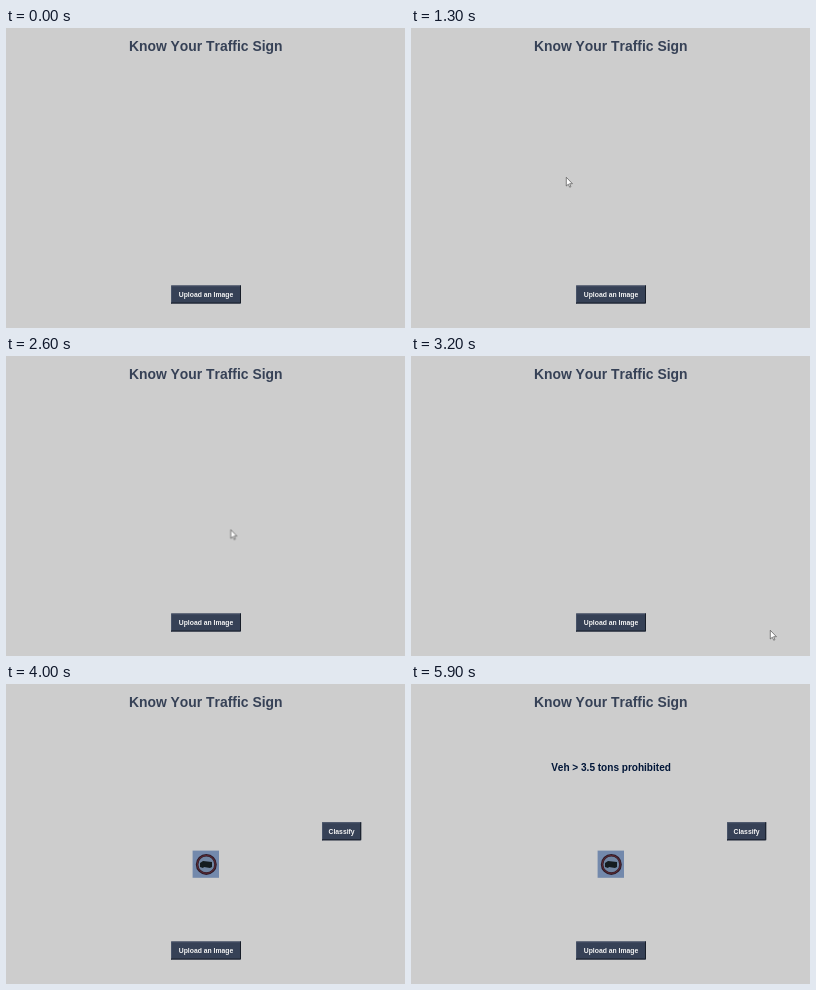
These frames come from a looping animation (399x300 px, 6 s). An HTML page:

```html
<!DOCTYPE html>
<html lang="en">
<head>
<meta charset="utf-8">
<title>Know Your Traffic Sign</title>
<style>
  html, body { margin: 0; width: 100%; height: 100%; overflow: hidden; background: #cdcdcd; }
  svg { display: block; width: 100%; height: 100%; }
  text {
    font-family: "Liberation Sans", Arial, sans-serif;
    font-weight: bold;
    font-kerning: none;
    text-anchor: middle;
  }
</style>
</head>
<body>
<svg viewBox="0 0 399 300">
  <text x="199.7" y="23.3" font-size="13.9" fill="#364156">Know Your Traffic Sign</text>
  <text id="result" x="200" y="86.8" font-size="10.05" fill="#011638">Veh &gt; 3.5 tons prohibited</text>

  <g id="sign">
    <rect x="186.6" y="166.6" width="26.4" height="27.2" fill="#7389ac"/>
    <circle cx="200.3" cy="180.4" r="9.2" fill="#7085a2" stroke="#2e1c27" stroke-width="2.6"/>
    <circle cx="200.3" cy="180.4" r="9" fill="none" stroke="#5e2934"/>
    <path d="M194 179l3-2 9 1v5l-2 1-6-1-1 1-3-1z" fill="#141c20"/>
  </g>

  <g id="buttons"></g>

  <path id="cursor" d="M.3 .3V9L2.3 7.2 3.7 10.2 4.9 9.7 3.6 6.7H6.4Z"
        fill="#fff" stroke="#444" stroke-width=".65" stroke-linejoin="round"/>
</svg>
<script>
const LOOP = 6000, TICK = 100;
const byId = id => document.getElementById(id);

// Plays [time, value] steps as hard changes; each value holds until the next.
function play(el, prop, steps) {
  const frames = steps.map(([t, v]) => ({ offset: t / LOOP, [prop]: v, easing: 'step-end' }));
  frames.push({ offset: 1, [prop]: steps[steps.length - 1][1] });
  el.animate(frames, { duration: LOOP, iterations: Infinity });
}

const appear = (el, from, to = LOOP) =>
  play(el, 'opacity', [[0, 0], [from, 1], ...(to < LOOP ? [[to, 0]] : [])]);

const RAISED = { fill: '#364156', ink: '#f4f4f4', light: '#485368', dark: '#171d28', shift: 0 };
const SUNKEN = { fill: '#f0f0f0', ink: '#1c1c28', light: '#8c8c8c', dark: '#f6f6f6', shift: .5 };

function face(x, y, w, h, label, { fill, ink, light, dark, shift }) {
  return `<g><rect x="${x}" y="${y}" width="${w}" height="${h}" fill="${fill}"/>
    <path d="M${x + .5} ${y + h}V${y + .5}H${x + w}" fill="none" stroke="${light}"/>
    <path d="M${x} ${y + h - .5}H${x + w - .5}V${y}" fill="none" stroke="${dark}"/>
    <text x="${x + w / 2 + shift}" y="${y + h / 2 + 2.6 + shift}" font-size="6.8" fill="${ink}">${label}</text></g>`;
}

function button(x, y, w, h, label, pressAt, releaseAt) {
  const group = document.createElementNS('http://www.w3.org/2000/svg', 'g');
  group.innerHTML = face(x, y, w, h, label, RAISED) + face(x, y, w, h, label, SUNKEN);
  byId('buttons').append(group);
  appear(group.lastElementChild, pressAt, releaseAt);
  return group;
}

// Eases the cursor through its moves, one hard step per tick.
function glide(el, [x, y], moves) {
  const steps = [[0, x, y]];
  for (const { start, end, to } of moves) {
    const [, x0, y0] = steps[steps.length - 1];
    for (let t = start; t <= end; t += TICK) {
      const k = (t - start + TICK) / (end - start + TICK);
      const e = k * k * (3 - 2 * k);
      steps.push([t, x0 + (to[0] - x0) * e, y0 + (to[1] - y0) * e]);
    }
  }
  play(el, 'transform', steps.map(([t, px, py]) => [t, `translate(${px}px, ${py}px)`]));
}

button(165, 257.5, 70, 18, 'Upload an Image', 800, 900);
const classify = button(316, 138.3, 39.2, 18, 'Classify', 4900, 5200);

appear(classify, 4000);
appear(byId('sign'), 4000);
appear(byId('result'), 5300);

const cursor = byId('cursor');
appear(cursor, 1200, 3900);
glide(cursor, [188, 228], [
  { start: 1300, end: 1400, to: [122, 70] },
  { start: 1600, end: 1900, to: [141, 112] },
  { start: 2400, end: 3000, to: [353, 268] },
  { start: 3100, end: 3200, to: [359, 274] },
  { start: 3700, end: 3800, to: [389, 262] }
]);
</script>
</body>
</html>
```
